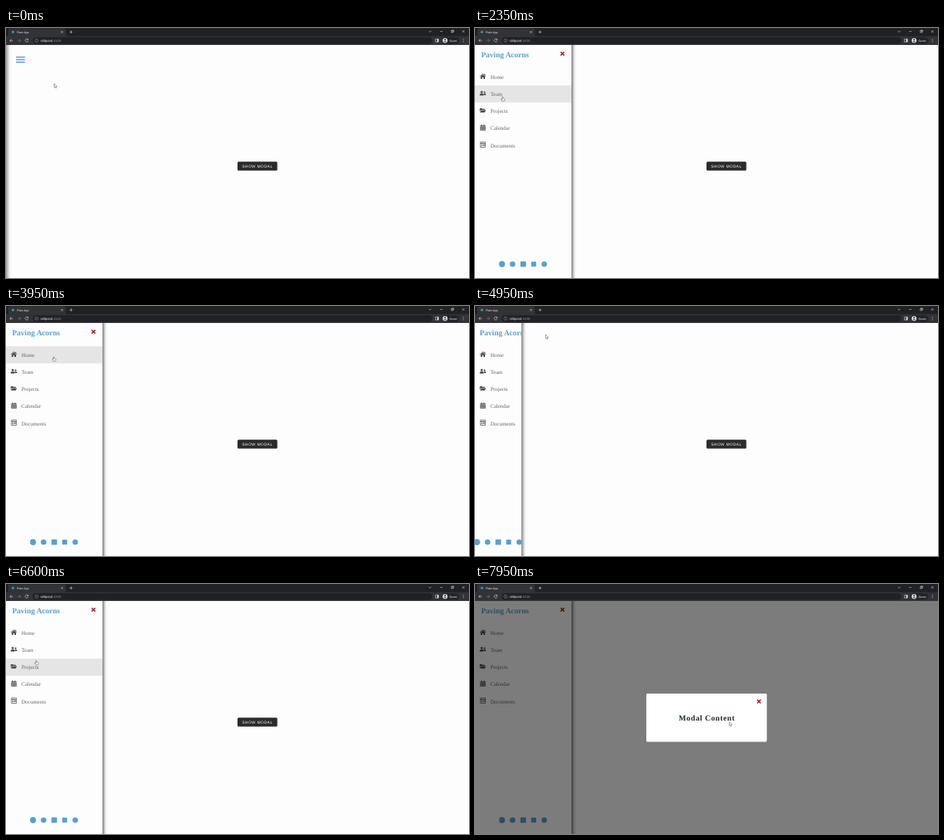
An HTML page for the animation above (8 s loop, 600x324 px).

```html
<!DOCTYPE html>
<html lang="en">
<head>
<meta charset="utf-8">
<title>Sidebar and modal</title>
<style>
  html, body { margin: 0; width: 100%; height: 100%; overflow: hidden; background: #fdfdfd; }
  svg.stage { display: block; width: 100%; height: 100%; cursor: default; }
  text { white-space: pre; text-rendering: geometricPrecision; }
  .ui { font-family: "Liberation Sans", Arial, sans-serif; }
  .serif { font-family: "Liberation Serif", "Times New Roman", serif; }
  .line { fill: none; stroke: #e8eaed; stroke-width: .55; }
  .cross { fill: none; stroke: #b3141e; stroke-width: 1.5; }
  .blue { fill: #58a0cf; }
</style>
</head>
<body>
<svg class="stage" viewBox="0 0 600 324">
  <defs>
    <filter id="soft" filterUnits="userSpaceOnUse" x="-20" y="0" width="640" height="360">
      <feGaussianBlur stdDeviation="2"/>
    </filter>
  </defs>

  <rect width="600" height="324" fill="#fdfdfd"/>
  <path id="burger" d="M13 37.8h11.6M13 41h11.6M13 44.2h11.6" stroke="#58a0cf" stroke-width="1.5"/>
  <rect x="300" y="173.2" width="51.6" height="11.6" rx="1.5" fill="#2b2b2b"/>
  <text class="ui" x="306" y="180.8" font-size="5" letter-spacing=".5" fill="#fff">SHOW MODAL</text>

  <rect id="shadow" x="-1.5" y="0" height="350" fill="#555" filter="url(#soft)"/>
  <svg id="side" height="324">
    <rect width="200" height="324" fill="#fdfdfd"/>
    <rect id="hover" width="200" height="22.1" fill="#e5e5e5"/>
    <g id="head">
      <text class="serif blue" x="6" y="37.6" font-size="10" font-weight="700">Paving Acorns</text>
      <path class="cross" d="M109 31l4.6 4.6m0-4.6l-4.6 4.6"/>
    </g>
    <g id="nav" fill="#4a4a4a"></g>
    <g id="social" class="blue">
      <circle cx="-27.5" cy="306" r="3.9"/>
      <circle cx="-13.8" cy="306" r="3.6"/>
      <rect x="-3.6" y="302.4" width="7.2" height="7.2" rx=".6"/>
      <rect x="10.3" y="302.8" width="6.4" height="6.4"/>
      <circle cx="27.2" cy="306" r="3.5"/>
    </g>
  </svg>

  <g id="modal">
    <rect y="22" width="600" height="302" opacity=".51"/>
    <rect x="222" y="142" width="156.2" height="62.4" rx="1.5" fill="#fff"/>
    <text class="serif" x="264" y="176.6" font-size="10" font-weight="700" letter-spacing=".625" fill="#1b272c">Modal Content</text>
    <path class="cross" d="M365.7 149.9l4.6 4.6m0-4.6l-4.6 4.6"/>
  </g>

  <g class="ui">
    <rect width="600" height="22" fill="#202124"/>
    <path d="M0 22V10.5H1.5Q3 10.5 3 9V2.5Q3 .5 5 .5H75.5Q77.5 .5 77.5 2.5V9Q77.5 10.5 79 10.5H600V22Z" fill="#323337"/>
    <circle cx="9" cy="5.2" r="1.6" fill="#3d9aa8"/>
    <text x="14" y="6.5" font-size="3.7" fill="#e8eaed">Plain App</text>
    <path class="line" d="M71.3 4l2.5 2.5m0-2.5l-2.5 2.5M82.3 5.2h4M84.3 3.2v4M548 3.8l1.6 1.5 1.6-1.5M562.6 4.5h3M577 3.6h2.3v2.3h-2.3zM577.8 3.5v-.7h2.3v2.3h-.7M591.3 3.1l2.8 2.8m0-2.8l-2.8 2.8"/>
    <rect x="34.5" y="12" width="518" height="8.4" rx="4.2" fill="#202124"/>
    <path class="line" d="M9.2 16.2H5m2-2l-2 2 2 2M28.4 14.8a2 2 0 1 0 .4 1.8M28.8 13.8v1.6h-1.6"/>
    <path class="line" d="M14.8 16.2H19m-2-2l2 2-2 2" style="stroke:#85878b"/>
    <path class="line" d="M39.6 15.9v1.4M39.6 14.8v.5M41.7 16.2a2.1 2.1 0 1 1-4.2 0a2.1 2.1 0 1 1 4.2 0" style="stroke:#a5a8ad;stroke-width:.45"/>
    <text x="44.5" y="17.7" font-size="4.35" fill="#e8eaed">stillpond<tspan fill="#8d9096">:4100</tspan></text>
    <path class="line" d="M556.6 14.3h3.8v3.8h-3.8z"/>
    <path d="M558.8 14.3h1.6v3.8h-1.6z" fill="#e8eaed"/>
    <rect x="564.6" y="12" width="23" height="8.4" rx="4.2" fill="#232427"/>
    <circle cx="569" cy="16.2" r="3.2" fill="#d5d8dc"/>
    <path d="M567.1 18.2a2 1.6 0 0 1 3.8 0z" fill="#44474b"/>
    <circle cx="569" cy="15.2" r="1.1" fill="#44474b"/>
    <text x="574.4" y="17.6" font-size="3.8" fill="#e8eaed">Guest</text>
    <path d="M592.8 14v.8m0 1v.8m0 1v.8" stroke="#e8eaed" stroke-width=".8"/>
  </g>

  <g id="cursor" stroke-width=".4" stroke-linejoin="round">
    <path id="arrow" d="M0 0V5.2L1.2 4.1 2 6 2.9 5.6 2.1 3.8H3.7Z" fill="#fff" stroke="#222"/>
    <path id="hand" d="M-.5 .4Q0-.3 .5 .4V2.4L2.6 2.9Q3.1 3.1 3 3.7L2.5 5.9H-.4L-1.9 3.7Q-1.8 3-1.2 3.3L-.5 4Z" fill="#fff" stroke="#222"/>
    <path id="beam" d="M-.9-2.6H.9M0-2.6V2.6M-.9 2.6H.9" fill="none" stroke="#222" stroke-width=".5"/>
  </g>
</svg>

<script>
const $ = id => document.getElementById(id);
const LOOP = 8000, FULL = 125, ROW_TOP = 52.3, ROW = 22.15;

// Icons are drawn in an 8 by 8 box
const items = [
  ["Home", "M4 .5L8 4 7.5 4.5 4 1.5.5 4.5 0 4ZM6 .9h1v2L6 2ZM1.2 4.5L4 2.1 6.8 4.5V7.4H4.8V5.2H3.2V7.4H1.2Z"],
  ["Team", "M1 2.4a1.5 1.5 0 1 1 3 0a1.5 1.5 0 1 1-3 0M0 6.8V5.7Q0 4.4 1.4 4.4H3.6Q5 4.4 5 5.7V6.8ZM5 2.7a1.2 1.2 0 1 1 2.4 0a1.2 1.2 0 1 1-2.4 0M5.5 6.4V5.5L5.1 4.4H6.8Q8 4.4 8 5.5V6.4Z"],
  ["Projects", "M0 5.6V1.7Q0 1.1 .6 1.1H2.6L3.4 1.9H6Q6.6 1.9 6.6 2.5V3.1H2.2Q1.6 3.1 1.3 3.6ZM2 3.6H8L6.6 6.4Q6.4 6.8 6 6.8H.2Z"],
  ["Calendar", "M.5 1.2H1.9V0H2.8V1.2H5.2V0H6.1V1.2H7.5V2.4H.5ZM.5 2.9H7.5V7.8H.5ZM1.4 3.7V4.7H2.6V3.7ZM3.4 3.7V4.7H4.6V3.7ZM5.4 3.7V4.7H6.6V3.7ZM1.4 5.7V6.7H2.6V5.7ZM3.4 5.7V6.7H4.6V5.7ZM5.4 5.7V6.7H6.6V5.7Z"],
  ["Documents", "M.5 .4H7.5V7.6H.5ZM1.2 1.1V2.2H6.8V1.1ZM1.2 2.9V6.9H6.8V2.9ZM1.7 3.5H3.9V4.2H1.7ZM1.7 5H3.9V5.6H1.7ZM4.6 3.5H6.3V5.6H4.6Z"]
];
$("nav").innerHTML = items.map(([label, icon], i) => {
  const y = ROW_TOP + ROW * i;
  return `<path transform="translate(6.2 ${y + 6.2})" fill-rule="evenodd" d="${icon}"/>
    <text class="serif" x="20" y="${y + 13.6}" font-size="7" fill="#666">${label}</text>`;
}).join("");

// Pointer path: time, x, y
const path = [
  [0, 62.5, 72], [80, 62.5, 72], [300, 64.5, 79.5], [430, 64.5, 79.5], [450, 152, 101.5],
  [560, 152, 101.5], [1350, 24.7, 44], [1800, 24.7, 44], [2150, 34, 72], [2600, 38, 112],
  [3050, 30, 143], [3200, 30, 143], [3700, 34, 90], [4250, 98, 34], [4600, 111.5, 32],
  [4800, 111.5, 32], [4950, 91.5, 37], [5400, 20, 38.8], [5950, 20, 38.8], [6450, 33, 96],
  [6750, 45, 102], [7150, 355, 176], [7350, 330, 179], [7550, 329.5, 178.5], [LOOP, 329.5, 178.5]
];

const clamp = v => Math.min(1, Math.max(0, v));

// The CSS "ease" curve: cubic-bezier(.25, .1, .25, 1)
function ease(p) {
  p = clamp(p);
  const curve = (s, a, b) => 3 * s * (1 - s) ** 2 * a + 3 * s * s * (1 - s) * b + s ** 3;
  let low = 0, high = 1;
  for (let i = 0; i < 20; i++) {
    const mid = (low + high) / 2;
    if (curve(mid, .25, .25) < p) low = mid; else high = mid;
  }
  return curve(low, .1, 1);
}

function pointerAt(t) {
  const i = path.findIndex(k => k[0] > t);
  const [t0, x0, y0] = path[i - 1], [t1, x1, y1] = path[i];
  const p = (t - t0) / (t1 - t0), s = p * p * (3 - 2 * p);
  return [x0 + (x1 - x0) * s, y0 + (y1 - y0) * s];
}

const show = (id, on) => $(id).setAttribute("visibility", on ? "visible" : "hidden");
const move = (id, x, y) => $(id).setAttribute("transform", `translate(${x} ${y})`);

function draw(t) {
  const slide = start => ease((t - start) / 400);
  const width = FULL * (slide(1728) - slide(4830) + slide(5612));
  const open = t >= 1728 && t < 4830 || t >= 5612;
  const modal = ease((t - 7720) / 230);
  const [x, y] = pointerAt(t);
  const within = (l, top, r, b) => x >= l && x <= r && y >= top && y <= b;

  $("side").setAttribute("width", width);
  $("shadow").setAttribute("width", width + 3);
  move("head", Math.max(0, (width - 119) / 3), 0);
  move("social", width / 2, 0);
  show("burger", !open);
  $("modal").setAttribute("opacity", modal);

  const row = Math.floor((y - ROW_TOP) / ROW);
  const onRow = x < width && row >= 0 && row < items.length;
  show("hover", onRow);
  $("hover").setAttribute("y", ROW_TOP + ROW * row);

  const onTitle = within(6, 29, 70, 40) && x < width;
  const onLink = onRow || !open && within(13, 36, 24.6, 46) ||
    width > 110 && within(108, 29, 117, 38) ||
    modal === 0 && within(300, 173, 351.6, 185);
  show("beam", onTitle);
  show("hand", onLink && !onTitle);
  show("arrow", !onLink && !onTitle);
  move("cursor", x, y);
}

function tick() {
  draw(performance.now() % LOOP);
  requestAnimationFrame(tick);
}
tick();
</script>
</body>
</html>
```
